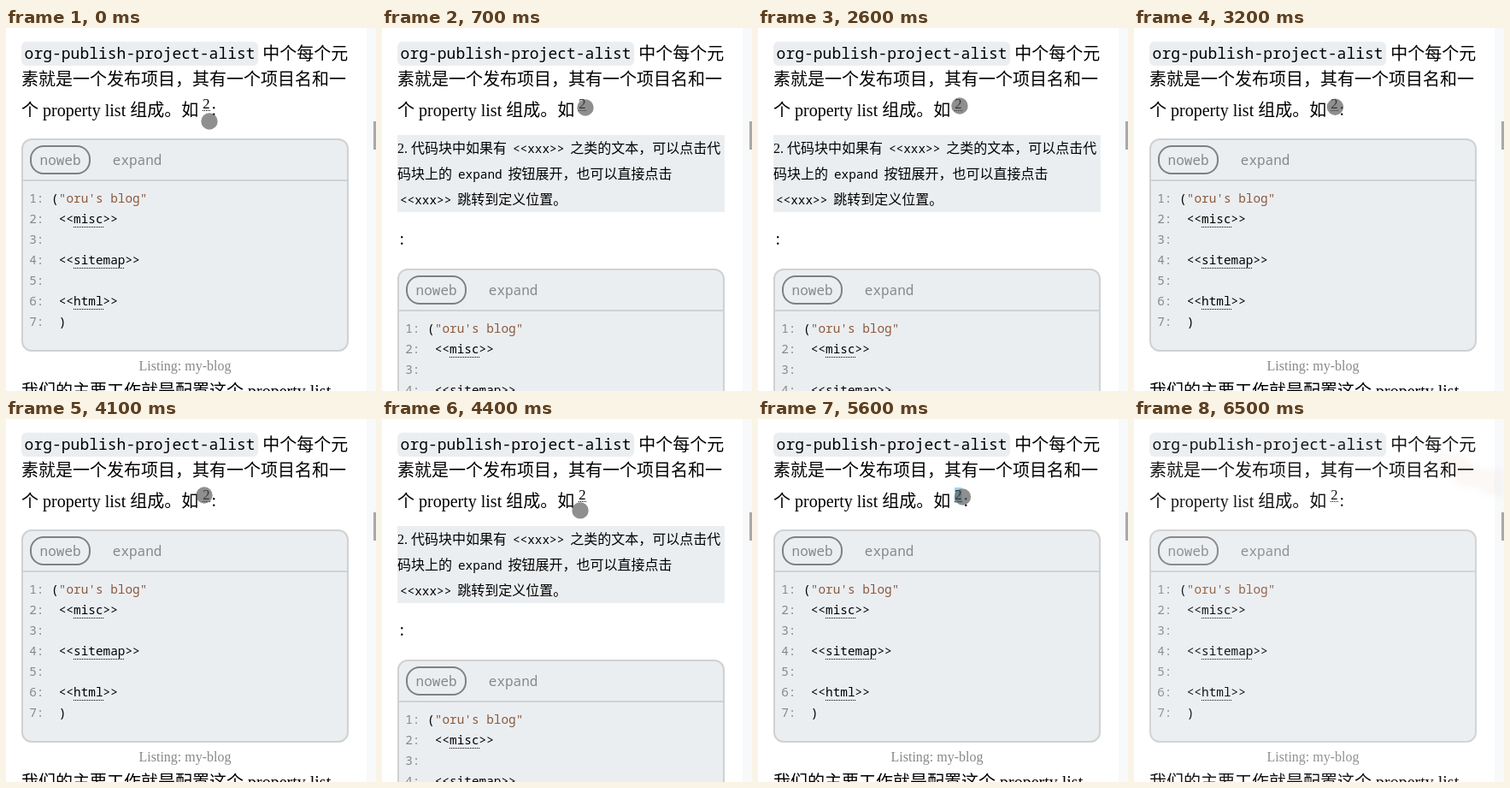
These frames come from a looping animation (433x424 px, 6800 ms). An HTML page:

```html
<!DOCTYPE html>
<html lang="zh-CN">
<head>
<meta charset="utf-8">
<style>
  html, body { margin: 0; width: 100%; height: 100%; overflow: hidden; background: #fff; }
  svg { display: block; width: 433px; height: 424px; }
  text { font: 20px "Liberation Serif", "Noto Sans CJK SC", "Noto Sans CJK", serif; font-weight: 300; white-space: pre; }
  .note text { font-size: 16px; }
  text.mono, .note text.mono { font: 14.4px "Noto Sans Mono", monospace; }
  text.name { font-size: 18px; }
  text.tab { font-size: 16px; fill: #888; }
  .num { fill: #888; }
  .str { fill: #8b5a3c; }
  text.caption { font-size: 16px; fill: #888; }
  .chip { fill: #ebeef1; }
  .dots { stroke: #000; stroke-dasharray: 1 1; }
</style>
</head>
<body>
<svg viewBox="0 0 433 424">
  <rect x="422" width="11" height="424" fill="#f8f9fb"/>
  <rect x="430" y="109" width="3" height="33" fill="#a8a8a8"/>

  <rect class="chip" x="18" y="16" width="277.2" height="28" rx="6"/>
  <text class="mono name" x="21.6" y="36">org-publish-project-alist</text>
  <text x="300.2" y="37">中个每个元</text>
  <text x="18" y="67">素就是一个发布项目，其有一个项目名和一</text>
  <text x="18" y="103">个 property list 组成。如</text>
  <rect id="pick" x="230" y="80" width="8.5" height="18" fill="#9fd3ee"/>
  <text x="230.2" y="94" style="font-size:16.67px">2</text>
  <path class="dots" d="M230 96.5h9"/>
  <text id="colon">:</text>

  <g id="note" class="note">
    <rect id="glow" class="chip" x="18" y="125" width="383" height="90"/>
    <rect class="chip" x="150" y="130" width="66.2" height="22" rx="5"/>
    <rect class="chip" x="86" y="160" width="57.6" height="22" rx="5"/>
    <rect class="chip" x="18" y="190" width="66.2" height="22" rx="5"/>
    <text x="18" y="146">2. 代码块中如果有</text>
    <text class="mono" x="152.9" y="146">&lt;&lt;xxx&gt;&gt;</text>
    <text x="220.2" y="146">之类的文本，可以点击代</text>
    <text x="18" y="176">码块上的</text>
    <text class="mono" x="88.9" y="176">expand</text>
    <text x="147.6" y="176">按钮展开，也可以直接点击</text>
    <text class="mono" x="20.9" y="206">&lt;&lt;xxx&gt;&gt;</text>
    <text x="88.2" y="206">跳转到定义位置。</text>
  </g>

  <g id="block">
    <rect x="19" y="130" width="381" height="247" rx="11" fill="#ebeef1" stroke="#d0d1d2" stroke-width="2"/>
    <path d="M20 178H399" stroke="#d0d1d2" stroke-width="2"/>
    <rect x="29" y="138" width="69" height="32" rx="15" fill="none" stroke="#808080" stroke-width="2"/>
    <text class="mono tab" x="39.6" y="160">noweb</text>
    <text class="mono tab" x="124.8" y="160">expand</text>
    <g id="code"></g>
    <text class="caption" x="209.5" y="400" text-anchor="middle">Listing: my-blog</text>
    <text x="18" y="431">我们的主要工作就是配置这个 property list</text>
  </g>

  <circle id="cursor" r="9.7" fill="#555" fill-opacity=".66"/>

  <g id="veil">
    <rect width="422" height="424" fill="#fff"/>
    <path d="M346 46Q360 36 378 40L402 58 433 60V90Q412 90 402 80L380 76Q376 62 346 46Z" fill="#d0aa90" style="filter:blur(3px)"/>
  </g>
</svg>
<script>
const LOOP = 6800, STEP = 100;
const $ = id => document.getElementById(id);

// code listing: a word is a reference, shown as <<word>>
const lines = ['', 'misc', '', 'sitemap', '', 'html', ''];
const CHAR = 8.64, LEFT = 27.2;
$('code').innerHTML = lines.map((word, i) => {
  const y = 204 + i * 24;
  let body = '';
  if (i === 0) body = ' (<tspan class="str">"oru\'s blog"</tspan>';
  else if (word) body = `  &lt;&lt;${word}&gt;&gt;`;
  else if (i === 6) body = '  )';
  const x = LEFT + 6 * CHAR;
  const dots = word ? `<path class="dots" d="M${Math.round(x)} ${y + 4.5}h${Math.round(word.length * CHAR)}"/>` : '';
  return `<text class="mono" x="${LEFT}" y="${y}"><tspan class="num">${i + 1}:</tspan>${body}</text>${dots}`;
}).join('');

// cursor moves: begin, end, x, y
const moves = [
  [0, 400, 238, 93],
  [700, 1200, 227.5, 147],
  [1700, 2200, 238, 89],
  [2500, 2600, 236, 91],
  [3100, 3700, 228, 108],
  [3700, 4100, 232, 89],
  [4300, 4600, 232, 158],
  [4700, 4800, 232.5, 160],
  [4800, 5300, 239.5, 91],
  [5600, 5800, 239.5, 104]
];

function cursorAt(t) {
  let x = 238, y = 109;
  for (const [a, b, tx, ty] of moves) {
    const p = Math.min(1, Math.max(0, (t - a) / (b - a)));
    const e = p * p * (3 - 2 * p);
    x += (tx - x) * e;
    y += (ty - y) * e;
  }
  return [x, y];
}

const within = (t, ...spans) => spans.some(([a, b]) => t >= a && t < b);
const show = (id, on) => $(id).style.display = on ? '' : 'none';

function draw(now) {
  const t = Math.floor(now % LOOP / STEP) * STEP;
  const open = within(t, [700, 3100], [4300, 5600]);
  show('note', open);
  show('glow', within(t, [700, 1500], [2400, 3100], [4300, 4800], [5400, 5600]));
  $('block').setAttribute('transform', `translate(0 ${open ? 152 : 0})`);
  $('colon').setAttribute('x', open ? 20.5 : 240.5);
  $('colon').setAttribute('y', open ? 253 : 102);
  show('pick', within(t, [5600, 5800]));

  const [x, y] = cursorAt(t);
  $('cursor').setAttribute('cx', x);
  $('cursor').setAttribute('cy', y);
  show('cursor', t < 6000);

  const fade = t < 6000 ? 0 : t < 6500 ? Math.min(4, (t - 5900) / STEP) * .015 : .08;
  $('veil').setAttribute('opacity', fade);
}

const start = performance.now();
function tick() {
  draw(performance.now() - start);
  requestAnimationFrame(tick);
}
tick();
</script>
</body>
</html>
```
